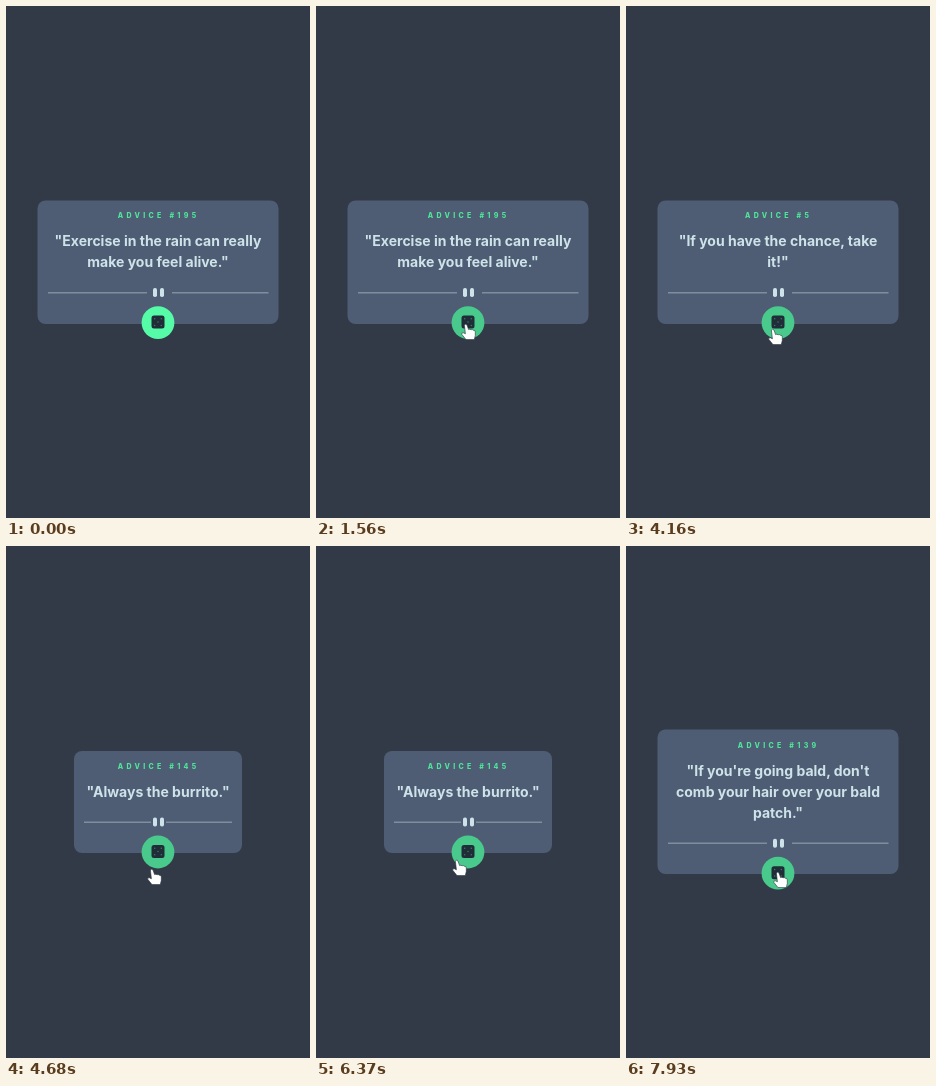
Write an HTML page that moves like this. It is 304 px wide and 512 px high and loops after 8 s.

```html
<!DOCTYPE html>
<html lang="en">
<head>
<meta charset="utf-8">
<title>Advice generator</title>
<style>
  html, body { margin: 0; width: 100%; height: 100%; overflow: hidden; background: #323a48; }
  svg { display: block; width: 100%; height: 100%; }
  .stage, .card, .cursor, .arrow, .hand { animation: 8s step-end -1ms infinite; }

  .panel { fill: #4e5d73; }
  .label { font: 800 7px Inter, sans-serif; letter-spacing: 3.3px; fill: #4fe69b; text-anchor: middle; }
  .quote { font: 700 14px Inter, sans-serif; fill: #cee3e9; text-anchor: middle; }
  .rule { stroke: #7f8d9e; stroke-width: 1.4; }

  .stage { animation-name: hover; }
  .rain { animation-name: rain; }
  .chance { animation-name: chance; }
  .burrito { animation-name: burrito; }
  .bald { animation-name: bald; }
  .cursor { animation-name: move; }
  .arrow { animation-name: arrow; }
  .hand { animation-name: hand; }

  @keyframes hover {
    0%, 60.125%, 87.75% { color: #55fba7; }
    13%, 73.125%, 94.25%, 100% { color: #49c98b; }
  }
  @keyframes rain { 0% { opacity: 1; } 32.5%, 100% { opacity: 0; } }
  @keyframes chance { 0%, 58.5%, 100% { opacity: 0; } 32.5% { opacity: 1; } }
  @keyframes burrito { 0%, 86.125%, 100% { opacity: 0; } 58.5% { opacity: 1; } }
  @keyframes bald { 0% { opacity: 0; } 86.125%, 100% { opacity: 1; } }
  @keyframes arrow {
    0%, 60.125%, 87.75% { opacity: 1; }
    13%, 71.5%, 94.25%, 100% { opacity: 0; }
  }
  @keyframes hand {
    0%, 60.125%, 87.75% { opacity: 0; }
    13%, 71.5%, 94.25%, 100% { opacity: 1; }
  }
  @keyframes move {
    0% { transform: translate(152px, 540px); }
    6.5% { transform: translate(151px, 483px); }
    8.125% { transform: translate(144px, 405px); }
    9.75% { transform: translate(138px, 344px); }
    11.375% { transform: translate(139px, 322px); }
    13% { transform: translate(145px, 319px); }
    14.625% { transform: translate(149px, 318px); }
    16.25% { transform: translate(150px, 318px); }
    43.875% { transform: translate(149px, 320px); }
    45.5% { transform: translate(148px, 322px); }
    52% { transform: translate(147px, 323px); }
    53.625% { transform: translate(146px, 323px); }
    60.125% { transform: translate(146px, 329px); }
    61.75% { transform: translate(147px, 350px); }
    63.375% { transform: translate(149px, 378px); }
    65% { transform: translate(151px, 396px); }
    66.625% { transform: translate(153px, 400px); }
    68.25% { transform: translate(154px, 388px); }
    69.875% { transform: translate(155px, 358px); }
    71.5% { transform: translate(153px, 318px); }
    73.125% { transform: translate(149px, 314px); }
    74.75% { transform: translate(146px, 313px); }
    78% { transform: translate(143px, 313px); }
    79.625% { transform: translate(141px, 314px); }
    92.625% { transform: translate(144px, 318px); }
    94.25% { transform: translate(149px, 323px); }
    95.875%, 100% { transform: translate(152px, 326px); }
  }
</style>
</head>
<body>
<svg viewBox="0 0 304 512">
  <defs>
    <!-- origin: middle of the divider -->
    <g id="controls">
      <g fill="#cee3e9">
        <rect x="-5" y="-4.5" width="4" height="9" rx="1.8"/>
        <rect x="2" y="-4.5" width="4" height="9" rx="1.8"/>
      </g>
      <circle cy="30" r="16.4" fill="currentColor"/>
      <rect x="-6.5" y="23" width="13" height="13" rx="2.5" fill="#202d39"/>
      <path d="M-3.3 26.2h0M3.3 26.2h0M0 29.5h0M-3.3 32.8h0M3.3 32.8h0"
        stroke="#3b7967" stroke-width="1.5" stroke-linecap="round"/>
    </g>
  </defs>
  <rect width="304" height="512" fill="#323a48"/>

  <g class="stage">
    <g class="card rain">
      <rect class="panel" x="31.5" y="194.5" width="241" height="123.5" rx="8"/>
      <text class="label" x="152.6" y="212.2">ADVICE #195</text>
      <text class="quote" x="152" y="240">"Exercise in the rain can really</text>
      <text class="quote" x="152" y="261">make you feel alive."</text>
      <path class="rule" d="M42 286.8H141M166 286.8H262.5"/>
      <use href="#controls" x="152" y="286.6"/>
    </g>
    <g class="card chance">
      <rect class="panel" x="31.5" y="194.5" width="241" height="123.5" rx="8"/>
      <text class="label" x="152.6" y="212.2">ADVICE #5</text>
      <text class="quote" x="152" y="240">"If you have the chance, take</text>
      <text class="quote" x="152" y="261">it!"</text>
      <path class="rule" d="M42 286.8H141M166 286.8H262.5"/>
      <use href="#controls" x="152" y="286.6"/>
    </g>
    <g class="card burrito">
      <rect class="panel" x="68" y="205" width="168" height="102" rx="8"/>
      <text class="label" x="152.6" y="223">ADVICE #145</text>
      <text class="quote" x="152" y="250.6">"Always the burrito."</text>
      <path class="rule" d="M78 276.2H145M160 276.2H226"/>
      <use href="#controls" x="152" y="276"/>
    </g>
    <g class="card bald">
      <rect class="panel" x="31.5" y="183.5" width="241" height="144.5" rx="8"/>
      <text class="label" x="152.6" y="202">ADVICE #139</text>
      <text class="quote" x="152" y="230">"If you're going bald, don't</text>
      <text class="quote" x="152" y="251">comb your hair over your bald</text>
      <text class="quote" x="152" y="272">patch."</text>
      <path class="rule" d="M42 297.3H141M166 297.3H262.5"/>
      <use href="#controls" x="152" y="297.2"/>
    </g>
  </g>

  <g class="cursor" stroke-linejoin="round">
    <path class="arrow" d="M0 0V16.5L3.8 13L6.4 19L9.2 17.8L6.6 12H11.5Z"
      fill="#0b0e13" stroke="#f4f6f8" stroke-width="1.1"/>
    <path class="hand" d="M-1.6 1.2Q-.4-.8 1 1L2.6 5.6Q4 4.6 5 5.8Q6.4 5 7.3 6.3Q9 5.8 9.3 7.8V11.5L8.3 15.6H0L-4.3 10.2Q-4.6 8.4-2.6 8.8L-.6 9.8Z"
      fill="#fff" stroke="#26313c" stroke-width=".6"/>
  </g>
</svg>
</body>
</html>
```
